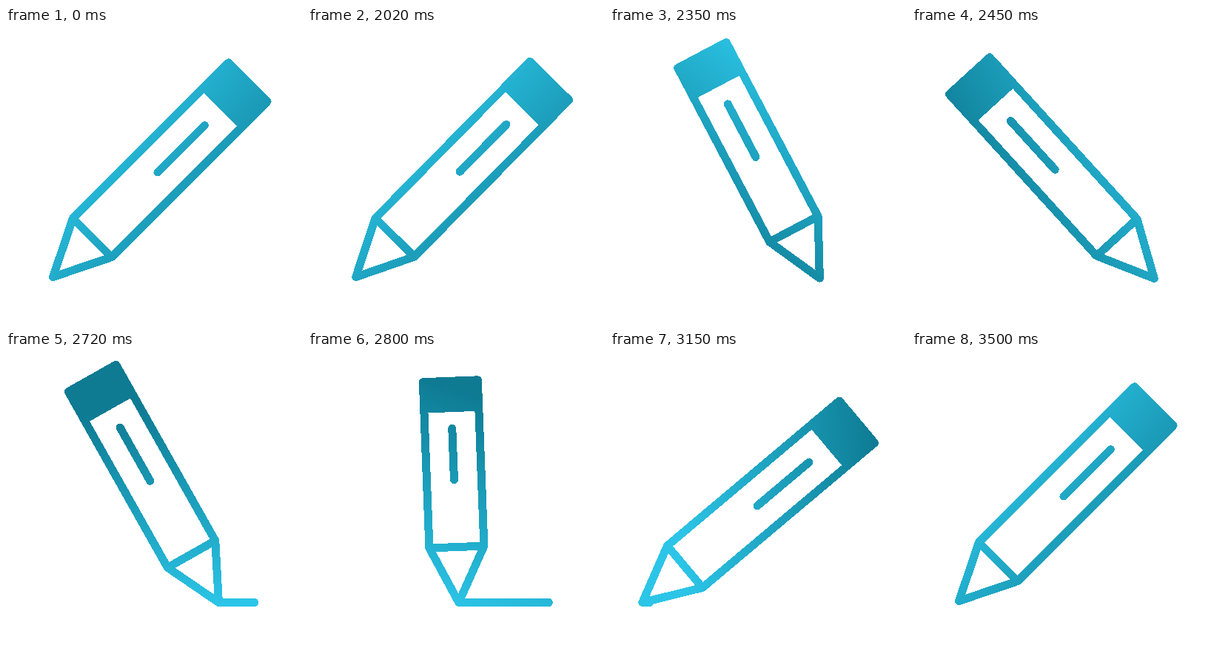
Recreate the animation shown at these times as an HTML page. Size 400 px wide and 400 px high, loop 3520 ms.

```html
<!DOCTYPE html>
<html lang="en">
<head>
<meta charset="utf-8">
<title>Writing pencil</title>
<style>
  html, body { margin: 0; width: 100%; height: 100%; overflow: hidden; background: #fff; }
  svg { display: block; width: 100%; height: 100%; }
</style>
</head>
<body>
<svg viewBox="0 0 400 400" shape-rendering="crispEdges">
  <defs>
    <linearGradient id="ink" gradientUnits="userSpaceOnUse">
      <stop offset="0" stop-color="#2cc5e7"/>
      <stop offset="1" stop-color="#0e7b93"/>
    </linearGradient>
  </defs>
  <g fill="none" stroke="url(#ink)" stroke-width="11" stroke-linecap="round" stroke-linejoin="round">
    <path id="line"/>
    <path id="body"/>
    <path id="eraser" fill="url(#ink)"/>
  </g>
</svg>
<script>
  const LOOP = 3520, START = 2010;
  const HALF = 37, BASE = 75, TOP = 372.6, ANCHOR = 50;
  const get = id => document.getElementById(id);
  const ink = get('ink'), line = get('line'), body = get('body'), eraser = get('eraser');

  // Gradient direction in degrees over time
  const TURN = [[2000, 40], [2220, 95], [2450, 150], [2720, 262], [2900, 322], [3500, 400]];

  // Cubic ease in and out
  function ease(t, start, length) {
    const u = Math.min(1, Math.max(0, (t - start) / length));
    return u < 0.5 ? 4 * u ** 3 : 1 - 4 * (1 - u) ** 3;
  }

  function along(points, t) {
    if (t <= points[0][0]) return points[0][1];
    for (let i = 1; i < points.length; i++) {
      const [t0, v0] = points[i - 1], [t1, v1] = points[i];
      if (t < t1) return v0 + (v1 - v0) * (t - t0) / (t1 - t0);
    }
    return points[points.length - 1][1];
  }

  const squash = p => Math.max(0, Math.sin(Math.PI * p)) ** 1.6;

  function paintInk(t) {
    const a = along(TURN, t) * Math.PI / 180;
    const dx = 140 * Math.cos(a), dy = 140 * Math.sin(a);
    const ends = { x1: 230 - dx, y1: 210 - dy, x2: 230 + dx, y2: 210 + dy };
    for (const key in ends) ink.setAttribute(key, ends[key].toFixed(2));
  }

  function draw(time) {
    const t = time < START ? 0 : time;
    const swing = ease(t, 1958, 619);
    const write = ease(t, 2517.5, 586);
    const settle = ease(t, 3085, 415);

    const x = 63.5 + 273 * swing - 293 * write + 20 * settle;
    const y = 336.5 + 2 * swing - 2 * settle;
    const angle = (45 - 90.4 * swing + 95.4 * write - 5 * settle) * Math.PI / 180;
    const stretch = 1 - 0.24 * (squash(swing) + squash(write)) + 0.02 * (write - settle);

    // Pencil space: side across the shaft, up measured from the tip
    const sin = Math.sin(angle), cos = Math.cos(angle);
    const at = (side, up) =>
      (x + side * cos + up * sin).toFixed(2) + ' ' + (y + side * sin - up * cos).toFixed(2);
    const reach = up => ANCHOR + (up - ANCHOR) * stretch;

    const top = reach(TOP), cap = reach(325.5);
    const left = at(-HALF, BASE), right = at(HALF, BASE);
    const topLeft = at(-HALF, top), topRight = at(HALF, top);

    body.setAttribute('d',
      `M${left}L${topLeft}L${topRight}L${right}Z` +
      `M${left}L${at(0, 0)}L${right}` +
      `M${at(0, reach(200))}L${at(0, reach(289.6))}`);
    eraser.setAttribute('d',
      `M${at(-HALF, cap)}L${topLeft}L${topRight}L${at(HALF, cap)}Z`);

    const tail = 336.5 - 293 * ease(t, 2674, 600);
    const drawn = write > 0.002 && tail > x;
    line.setAttribute('d', drawn ? `M${tail.toFixed(2)} 338.5H${x.toFixed(2)}` : '');

    paintInk(t);
  }

  const begin = performance.now();
  function tick() {
    draw((performance.now() - begin) % LOOP);
    requestAnimationFrame(tick);
  }
  draw(0);
  requestAnimationFrame(tick);
</script>
</body>
</html>
```
